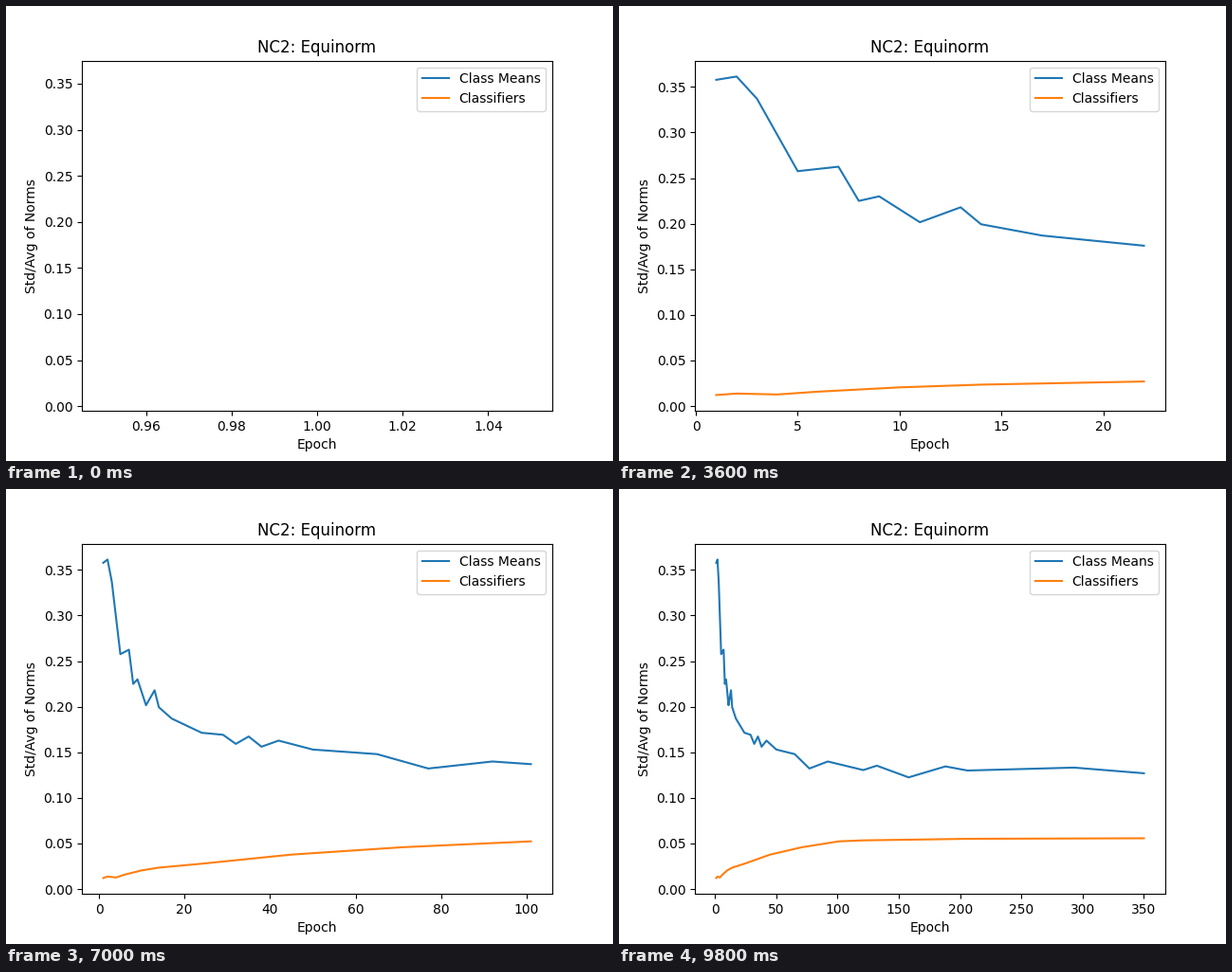
Animation, 640 px wide and 480 px high, one loop 10 s. Source, as a matplotlib script:

```python
import matplotlib.pyplot as plt
import numpy as np
from matplotlib.animation import FuncAnimation

FRAMES = 50
INTERVAL = 200
LAST_EPOCH = 350

# Log-spaced whole epochs; rounding merges the crowded early ones
epochs = np.unique(np.floor(LAST_EPOCH ** np.linspace(0, 1, 67) + 0.55))


def curve(*points):
    """Straight segments through (epoch, value) turning points."""
    x, y = zip(*points)
    return np.interp(epochs, x, y)


means = curve(
    (1, .3578), (2, .3614), (3, .337), (5, .2576), (7, .2625), (8, .225),
    (9, .230), (11, .2016), (13, .218), (14, .1994), (17, .187),
    (24, .1714), (29, .1692), (32, .1592), (35, .1673), (38, .1561),
    (42, .1628), (50, .153), (65, .148), (77, .1322), (92, .1399),
    (121, .1305), (132, .1353), (158, .1225), (188, .1345), (206, .130),
    (293, .1332), (350, .127))

classifiers = curve(
    (1, .0121), (2, .0137), (4, .0127), (6, .0158), (10, .0205),
    (14, .0235), (24, .0278), (45, .0378), (71, .0459), (101, .0523),
    (121, .0534), (206, .0551), (350, .0557))

fig, ax = plt.subplots(figsize=(6.4, 4.8), dpi=100)


def draw(frame):
    n = frame + 1
    ax.clear()
    ax.plot(epochs[:n], means[:n], label="Class Means")
    ax.plot(epochs[:n], classifiers[:n], label="Classifiers")
    ax.set_title("NC2: Equinorm")
    ax.set_xlabel("Epoch")
    ax.set_ylabel("Std/Avg of Norms")
    ax.legend(loc="best")
    return ax.lines


anim = FuncAnimation(fig, draw, frames=FRAMES, interval=INTERVAL,
                     init_func=lambda: draw(0), repeat=True, repeat_delay=0)
plt.show()
```
